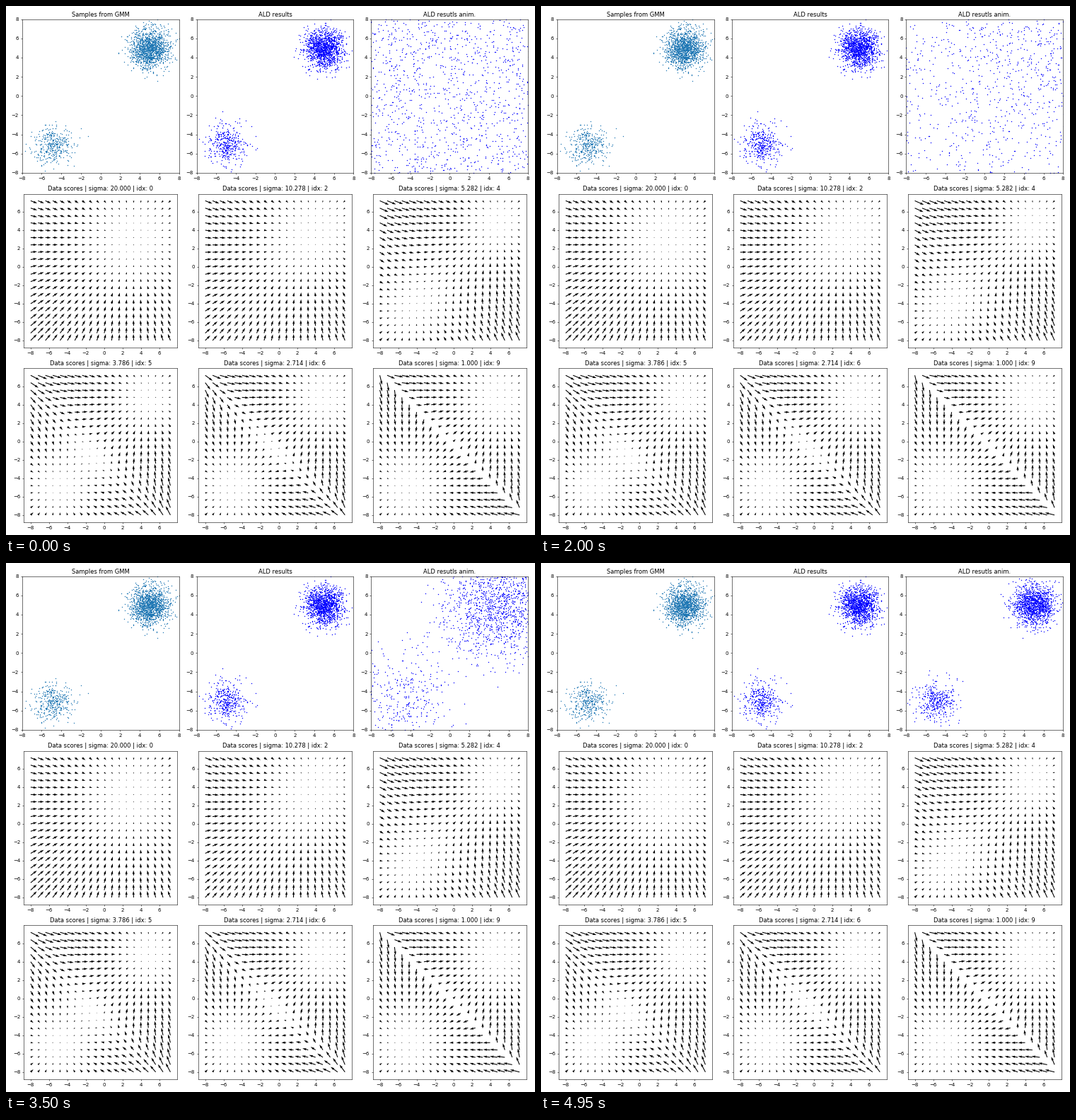
Write a matplotlib script that moves like this. It is 748 by 748 pixels and loops after 5000 ms.

```python
import numpy as np
import matplotlib.pyplot as plt
from matplotlib.animation import FuncAnimation

SIZE, DPI = 748, 50
FRAMES, INTERVAL = 100, 50
STEPS_PER_SIGMA, STEPS_PER_FRAME = 100, 10
N = 1750
LIMIT = 8

MEANS = np.array([[5.0, 5.0], [-5.0, -5.0]])
WEIGHTS = np.array([0.8, 0.2])
SIGMAS = np.geomspace(20, 1, 10)

rng = np.random.default_rng(7)


def score(points, sigma):
    """Gradient of the log density of the mixture at one noise level."""
    diff = MEANS - points[:, None, :]
    logits = np.log(WEIGHTS) - (diff ** 2).sum(-1) / (2 * sigma ** 2)
    resp = np.exp(logits - logits.max(1, keepdims=True))
    resp /= resp.sum(1, keepdims=True)
    return (resp[..., None] * diff).sum(1) / sigma ** 2


def sample_mixture(extra):
    """Mixture samples with tight tails plus a few chosen stragglers."""
    noise = rng.normal(size=(N, 2))
    radius = np.hypot(*noise.T)[:, None]
    noise *= np.minimum(1, 3.2 / radius)
    which = rng.choice(2, size=N, p=WEIGHTS)
    return np.vstack([MEANS[which] + noise, extra])


def langevin_states():
    """Positions at each frame of annealed Langevin dynamics."""
    points = rng.uniform(-10.5, 10.5, (N, 2))
    states = []
    for step in range(FRAMES * STEPS_PER_FRAME):
        if step % STEPS_PER_FRAME == 0:
            states.append(points)
        sigma = SIGMAS[step // STEPS_PER_SIGMA]
        rate = 0.1 * (sigma / SIGMAS[-1]) ** 2
        noise = rng.normal(size=(N, 2))
        points = points + rate / 2 * score(points, sigma) + np.sqrt(rate) * noise
    return states


def scatter_panel(ax, title, points, color):
    ax.set_title(title)
    ax.set_xlim(-LIMIT, LIMIT)
    ax.set_ylim(-LIMIT, LIMIT)
    return ax.scatter(*points.T, s=1, color=color)


def score_panel(ax, idx):
    sigma = SIGMAS[idx]
    ax.set_title(f"Data scores | sigma: {sigma:.3f} | idx: {idx}")
    ax.quiver(*grid.T, *score(grid, sigma).T, width=0.005)
    ax.set_aspect("equal", adjustable="box")


fig, axes = plt.subplots(3, 3, figsize=(SIZE / DPI, SIZE / DPI), dpi=DPI)
*stills, live = axes[0]

samples = sample_mixture([(2.1, 6.2), (-1.3, -4.2), (-2, -3.4), (5.8, 1.6)])
results = sample_mixture([(-5.4, -1.6), (-2, -5.6), (-2, -4.2), (4.3, 1.8)])
states = langevin_states()

scatter_panel(stills[0], "Samples from GMM", samples, "tab:blue")
scatter_panel(stills[1], "ALD results", results, "blue")
dots = scatter_panel(live, "ALD resutls anim.", states[0], "blue")

axis = np.arange(20) * 0.8 - 8
grid = np.stack(np.meshgrid(axis, axis), -1).reshape(-1, 2)
for ax, idx in zip(axes[1:].flat, [0, 2, 4, 5, 6, 9]):
    score_panel(ax, idx)
    stills.append(ax)

fig.tight_layout()

# Bake the still panels into one background image to keep redraws fast
live.set_visible(False)
fig.canvas.draw()
background = np.array(fig.canvas.buffer_rgba())
for ax in stills:
    ax.set_visible(False)
fig.figimage(background, zorder=-1)
live.set_visible(True)
live.set_zorder(1)


def update(frame):
    dots.set_offsets(states[frame])
    return [dots]


anim = FuncAnimation(fig, update, frames=FRAMES, interval=INTERVAL,
                     repeat=True, repeat_delay=0)
plt.show()
```
